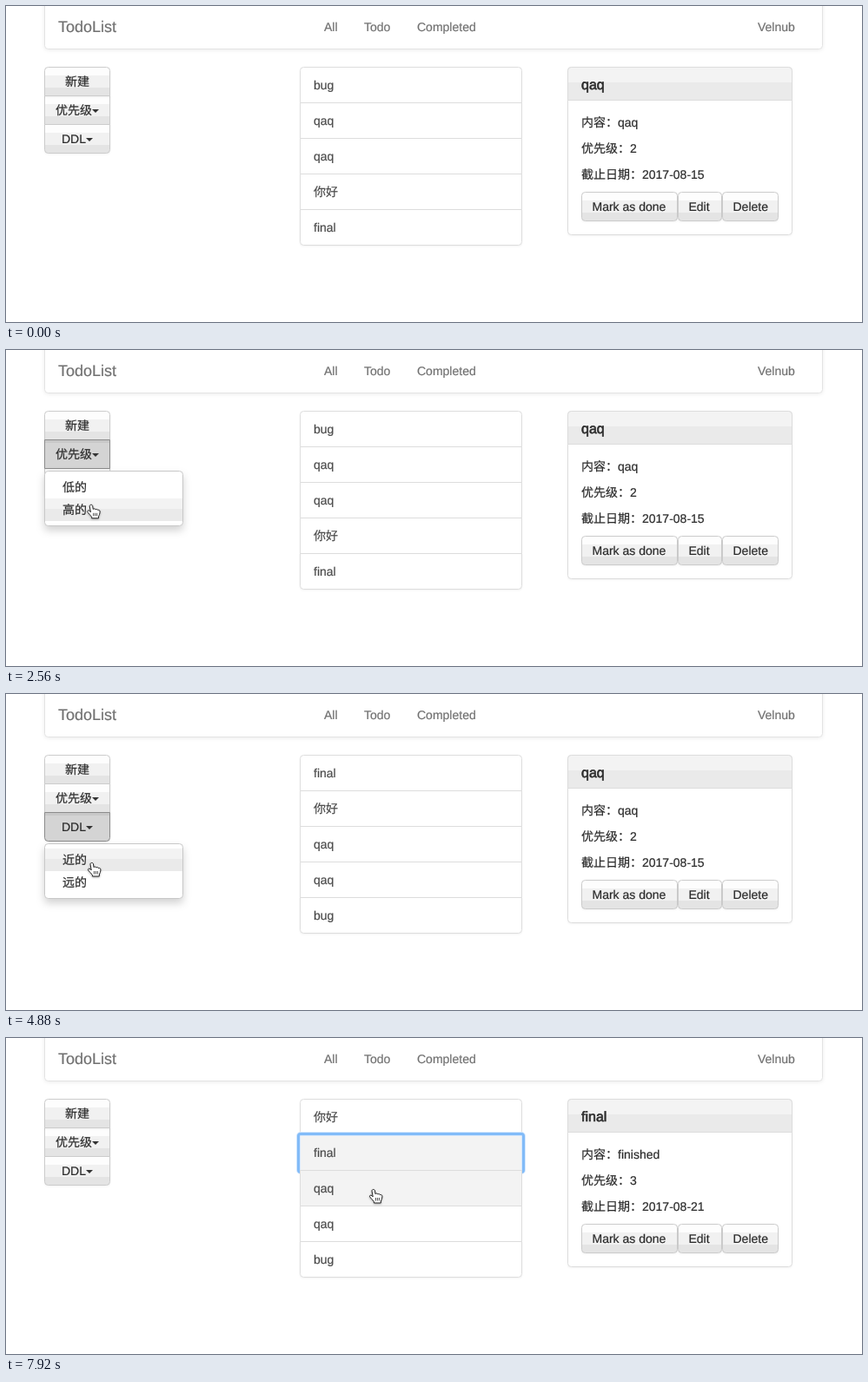
These frames come from a looping animation (985 by 364 pixels, 8000 ms). An HTML page:

```html
<!DOCTYPE html>
<html lang="zh-CN">
<head>
<meta charset="utf-8">
<title>TodoList</title>
<style>
html, body { margin: 0; width: 100%; height: 100%; overflow: hidden; background: #fff; }
svg { display: block; }
text {
  font: 14px "Liberation Sans", Arial, "Noto Sans CJK SC", "Noto Sans CJK", sans-serif;
  fill: #2b2b2b; stroke: #2b2b2b; stroke-width: .2px; white-space: pre; text-rendering: geometricPrecision;
}
.nav { fill: #717171; stroke: #717171; }
.brand { font-size: 18px; }
.item { fill: #4a4a4a; stroke: #4a4a4a; }
.title { font-size: 16px; stroke-width: .6px; }
.lift { filter: drop-shadow(0 1px 1px rgba(0,0,0,.05)); }
.bar { filter: drop-shadow(0 1px 2px rgba(0,0,0,.075)); }
.float { filter: drop-shadow(0 5px 5px rgba(0,0,0,.175)); }
.cursor { filter: drop-shadow(0 1px 1px rgba(0,0,0,.3)); }
</style>
</head>
<body>
<svg width="985" height="364" viewBox="0 0 985 364">
  <defs id="defs"></defs>
  <g id="stage"></g>
</svg>
<script>
const LOOP = 8000, TICK = 80;
const stage = document.getElementById('stage');

// Vertical fills: colour bands, each ending at a share of the height
const bands = (id, ...list) => {
  let from = 0;
  return `<linearGradient id="${id}" x2="0" y2="1">` + list.map(([color, to]) => {
    const stops = [from, to].map(o => `<stop offset="${o}" stop-color="${color}"/>`).join('');
    from = to;
    return stops;
  }).join('') + '</linearGradient>';
};
document.getElementById('defs').innerHTML =
  bands('btn', ['#fdfdfd', .28], ['#f1f1f1', .72], ['#e4e4e4', 1]) +
  bands('head', ['#f3f3f3', .45], ['#eaeaea', 1]) +
  bands('hot', ['#e8e8e8', .4], ['#e2e2e2', 1]) +
  bands('open', ['#c8c8c8', .12], ['#d4d4d4', 1]);

// Layout
const side = { x: 44, y: 70, w: 76, step: 33 };
const list = { x: 338, y: 70, w: 256, step: 41 };
const menuTop = menu => side.y + 36 + side.step * menu;
const optionTop = (menu, i) => menuTop(menu) + 6 + 26 * i;
const choices = [[], ['低的', '高的'], ['近的', '远的']];

const onButton = i => ({ x: 94, y: side.y + side.step * i + 27 });
const onOption = (menu, i) => ({ x: 99, y: optionTop(menu, i) + 18 });
const onRow = (i, dx, dy) => ({ x: list.x + dx, y: list.y + list.step * i + dy });

// State
const byLevel = ['你好', 'final', 'qaq', 'qaq', 'bug'];
const byDate = ['final', '你好', 'qaq', 'qaq', 'bug'];
const tasks = {
  qaq: { body: 'qaq', level: 2, due: '2017-08-15' },
  你好: { body: '你好', level: 3, due: '2017-08-11' },
  final: { body: 'finished', level: 3, due: '2017-08-21' }
};
const first = { menu: 0, names: [...byLevel].reverse(), row: -1, name: 'qaq' };
first.names = ['bug', 'qaq', 'qaq', '你好', 'final'];

// Pointer moves, each with the click that may follow
const entry = { x: 357, y: 325 };
const move = (from, to, spot, click, change) => ({ from, to, spot, click, change });
const script = [
  move(80, 1120, onButton(1), 1120, { menu: 1 }),
  move(1200, 1600, onOption(1, 0), 1840, { menu: 0 }),
  move(1760, 2000, onButton(1), 2320, { menu: 1 }),
  move(2320, 2640, onOption(1, 1), 2720, { menu: 0, names: byLevel }),
  move(2720, 3200, { x: 92, y: 175 }),
  move(3200, 3440, onButton(2), 3520, { menu: 2 }),
  move(3600, 3920, onOption(2, 1), 4000, { menu: 0, names: byDate }),
  move(4000, 4320, onButton(2), 4480, { menu: 2 }),
  move(4480, 4800, onOption(2, 0), 4960, { menu: 0, names: byLevel }),
  move(4960, 5440, { x: 88, y: 238 }),
  move(5520, 6000, onRow(1, 73, 1)),
  move(6000, 6160, onRow(0, 76, 28), 6240, { row: 0, name: '你好' }),
  move(6240, 6320, onRow(1, 74, 3)),
  move(6400, 6800, onRow(1, 80, 17), 7520, { row: 1, name: 'final' }),
  move(7520, 7920, onRow(2, 85, 24))
];

const stateAt = t => Object.assign({}, first, ...script.filter(m => m.click <= t).map(m => m.change));

function pointer(t) {
  if (t < script[0].from) return null;
  return script.reduce((p, m) => {
    const k = Math.min(1, Math.max(0, (t - m.from) / (m.to - m.from)));
    const e = k * k * (3 - 2 * k);
    return { x: p.x + (m.spot.x - p.x) * e, y: p.y + (m.spot.y - p.y) * e };
  }, entry);
}

// Index of the cell under the pointer in a column, or -1
function hit(p, n, { x, y, w, step }) {
  if (!p || p.x < x || p.x >= x + w) return -1;
  const i = Math.floor((p.y - y) / step);
  return i >= 0 && i < n ? i : -1;
}

const text = (x, y, s, cls = '') => `<text x="${x}" y="${y}" class="${cls}">${s}</text>`;
const caret = (x, y) => `<path fill="#333" d="M${x} ${y}h8l-4 4z"/>`;

// Box with separate top and bottom corner radii, aligned to whole pixels
function box(x, y, w, h, fill, stroke, rt = 4, rb = 4, cls = '') {
  const l = x + .5, t = y + .5, r = x + w - .5, b = y + h - .5;
  return `<path class="${cls}" fill="${fill}" stroke="${stroke}" d="M${l} ${t + rt}Q${l} ${t} ${l + rt} ${t}` +
    `H${r - rt}Q${r} ${t} ${r} ${t + rt}V${b - rb}Q${r} ${b} ${r - rb} ${b}` +
    `H${l + rb}Q${l} ${b} ${l} ${b - rb}Z"/>`;
}

function navbar() {
  return box(44, -10, 896, 60, '#fff', '#e3e3e3', 4, 4, 'bar') +
    text(60, 30, 'TodoList', 'nav brand') + text(366, 29, 'All', 'nav') + text(412, 29, 'Todo', 'nav') +
    text(473, 29, 'Completed', 'nav') + text(865, 29, 'Velnub', 'nav');
}

function sidebar(hover, menu) {
  const draw = i => {
    const [fill, line] = menu && menu === i ? ['url(#open)', '#8c8c8c']
      : hover === i ? ['url(#hot)', '#adadad'] : ['url(#btn)', '#ccc'];
    return box(side.x, side.y + side.step * i, side.w, 34, fill, line, i ? 0 : 4, i === 2 ? 4 : 0, 'lift');
  };
  // Highlighted buttons go last so their borders stay on top
  const lit = i => +(i === hover || i === menu);
  return [0, 1, 2].sort((a, b) => lit(a) - lit(b)).map(draw).join('') +
    text(68, 92, '新建') + text(57, 125, '优先级') + caret(99, 119) +
    text(64, 158, 'DDL') + caret(92, 152);
}

function ring(y) {
  const stroke = (w, color) => `<rect x="336.5" y="${y - .5}" width="259" height="44" rx="2.5" ` +
    `fill="none" stroke="${color}" stroke-width="${w}"/>`;
  return stroke(5, '#d5e8fd') + stroke(3, '#82bbf8');
}

function taskList(names, hover, focus) {
  return names.map((name, i) => {
    const y = list.y + list.step * i, end = i === names.length - 1;
    const fill = i === hover || i === focus ? '#f3f3f3' : '#fff';
    return box(list.x, y, list.w, 42, fill, '#ddd', i ? 0 : 4, end ? 4 : 0, end ? 'lift' : '') +
      (i === focus ? ring(y) : '') + text(354, y + 26, name, 'item');
  }).join('');
}

function panel(name) {
  const d = tasks[name];
  const lines = ['内容：' + d.body, '优先级：' + d.level, '截止日期：' + d.due];
  const button = (x, w, s) => box(x, 214, w, 34, 'url(#btn)', '#ccc', 4, 4, 'lift') + text(x + 12.5, 236, s);
  return box(646, 70, 259, 194, '#fff', '#ddd', 4, 4, 'lift') +
    box(646, 70, 259, 39, 'url(#head)', '#ddd', 4, 0) + text(662, 96, name, 'title') +
    lines.map((s, i) => text(662, 139 + 30 * i, s)).join('') +
    button(662, 111, 'Mark as done') + button(773, 51, 'Edit') + button(824, 65, 'Delete');
}

function dropdown(menu, hover) {
  if (!menu) return '';
  return box(side.x, menuTop(menu), 160, 64, '#fff', '#c8c8c8', 4, 4, 'float') + choices[menu].map((s, i) => {
    const y = optionTop(menu, i);
    return (i === hover ? `<rect x="45" y="${y}" width="158" height="26" fill="url(#head)"/>` : '') +
      text(65, y + 18, s);
  }).join('');
}

function cursor(p, hand) {
  if (!p) return '';
  const shape = hand
    ? `<path fill="#fff" stroke="#222" d="M-2 1.6C-2-.5 1.4-.6 1.5 1.5L2 5.2C2.6 4.2 4.6 4.3 4.9 5.6C5.6 4.8 7.3 5 7.6 6.3C8.4 5.6 9.8 6.2 9.9 7.6C10 10.5 8.8 12 8.3 13.5V15.5H.4V14C-1 12-3.5 9.8-4.5 8.2C-5 6.9-3.2 6-2 7.2L-.8 8.4Z"/>` +
      `<path stroke="#222" stroke-width=".8" d="M2.4 9.5v3.5M4.4 9.5v3.5M6.4 9.5v3.5"/>`
    : `<path fill="#000" stroke="#fff" paint-order="stroke" stroke-width="1.6" d="M0 0V13l3-2.8 2 4.6 2.2-.9-2-4.5h4.2Z"/>`;
  return `<g class="cursor" transform="translate(${p.x} ${p.y - (hand ? 1.5 : 0)})">${shape}</g>`;
}

function render(t) {
  const p = pointer(t), { menu, names, row, name } = stateAt(t);
  const inMenu = menu && hit(p, 1, { x: side.x, y: menuTop(menu), w: 160, step: 64 }) === 0;
  const option = inMenu ? hit(p, 2, { x: 45, y: optionTop(menu, 0), w: 158, step: 26 }) : -1;
  const button = inMenu ? -1 : hit(p, 3, side);
  const over = hit(p, names.length, list);
  stage.innerHTML = navbar() + sidebar(button, menu) + taskList(names, over, row) +
    panel(name) + dropdown(menu, option) + cursor(p, Math.max(option, button, over) >= 0);
}

let shown = -1;
function loop() {
  const t = Math.floor(performance.now() % LOOP / TICK) * TICK;
  if (t !== shown) render(shown = t);
  requestAnimationFrame(loop);
}
loop();
</script>
</body>
</html>
```
